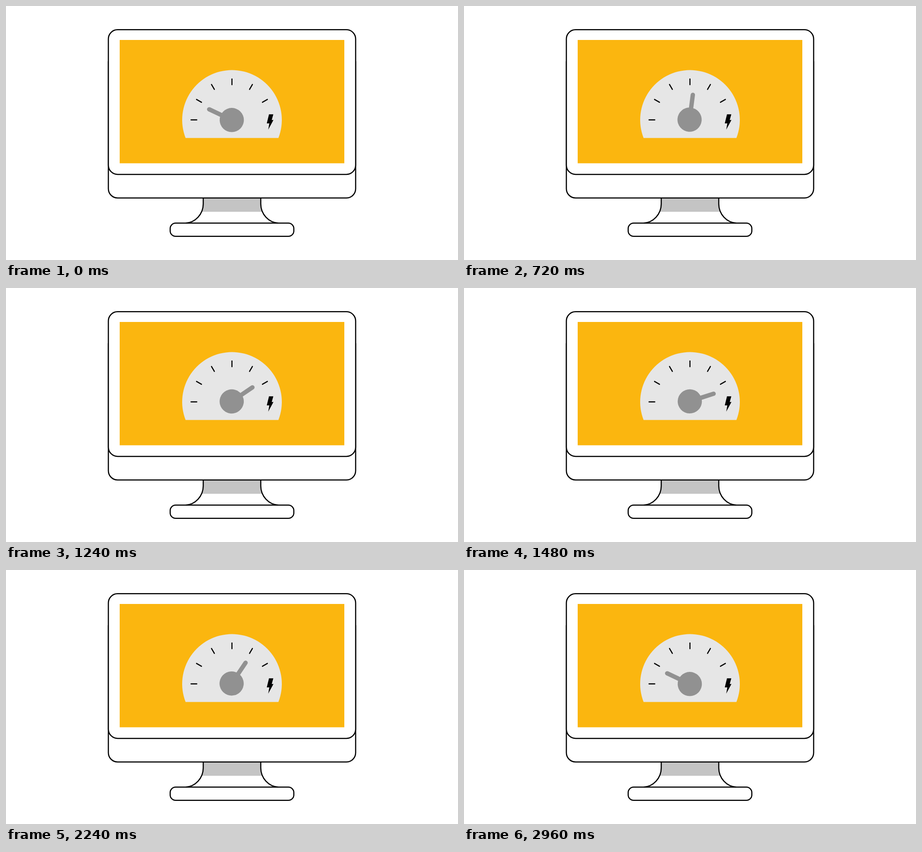
Recreate the animation shown at these times as an HTML page. Size 998x561 px, loop 3 s.

```html
<!DOCTYPE html>
<html lang="en">
<head>
<meta charset="utf-8">
<title>Power gauge</title>
<style>
  html, body { margin: 0; width: 100%; height: 100%; overflow: hidden; background: #fff; }
  svg { display: block; width: 100vw; height: 100vh; }
  .line { fill: #fff; stroke: #000; stroke-width: 2.5; }
  #ticks { stroke: #000; stroke-width: 2.4; stroke-linecap: round; }
</style>
</head>
<body>
<svg viewBox="0 0 998 561">
  <!-- stand -->
  <path fill="#c4c4c4" d="M435.5 424H562.5V437Q562.5 446 565 454.5H433Q435.5 446 435.5 437Z"/>
  <path class="line" style="fill:none" d="M435.5 424V437C435.5 460 418 478 397 479.5M562.5 424V437C562.5 460 580 478 601 479.5"/>
  <rect class="line" x="362.5" y="479.5" width="273" height="29.2" rx="12"/>

  <!-- monitor -->
  <path class="line" d="M226 122V403.5A20.5 20.5 0 0 0 246.5 424H751.5A20.5 20.5 0 0 0 772 403.5V122"/>
  <rect class="line" x="226" y="52.3" width="546" height="319.6" rx="20.5"/>
  <rect x="251" y="75" width="496" height="272.4" fill="#fbb60f"/>

  <!-- gauge -->
  <path fill="#e6e6e6" d="M396.5 291.5A110 110 0 1 1 601.5 291.5Z"/>
  <g id="ticks"></g>
  <path d="M580.7 239.2H590.2L586.7 251.8H590.5L579 273L581.4 259.2H575.8Z"/>
  <g id="needle" fill="#919191">
    <path d="M498.5 251.8L448.6 228.2" stroke="#919191" stroke-width="9.6" stroke-linecap="round"/>
    <circle cx="498.5" cy="251.8" r="26.7"/>
  </g>
</svg>
<script>
  const LOOP = 3000, STEP = 40, SWEEP = 139.2;
  const needle = document.getElementById("needle");
  const ticks = document.getElementById("ticks");

  for (let deg = 0; deg <= 150; deg += 30) {
    const tick = document.createElementNS("http://www.w3.org/2000/svg", "path");
    tick.setAttribute("d", "M408.6 251.5H421.2");
    tick.setAttribute("transform", `rotate(${deg} 498.9 251.5)`);
    ticks.append(tick);
  }

  const phase = (t, from, to) => Math.min(1, Math.max(0, (t - from) / (to - from)));
  const slowDown = s => s * (1.44 - 0.44 * s);
  const easeInOut = s => s * s * (3 - 2 * s);

  function draw(now) {
    const t = Math.floor((now % LOOP) / STEP) * STEP;
    const rise = slowDown(phase(t, 160, 1520));
    const fall = easeInOut(phase(t, 1840, 2960));
    needle.setAttribute("transform", `rotate(${SWEEP * (rise - fall)} 498.8 251.1)`);
  }

  const start = performance.now();
  function tick() {
    draw(performance.now() - start);
    requestAnimationFrame(tick);
  }
  tick();
</script>
</body>
</html>
```
